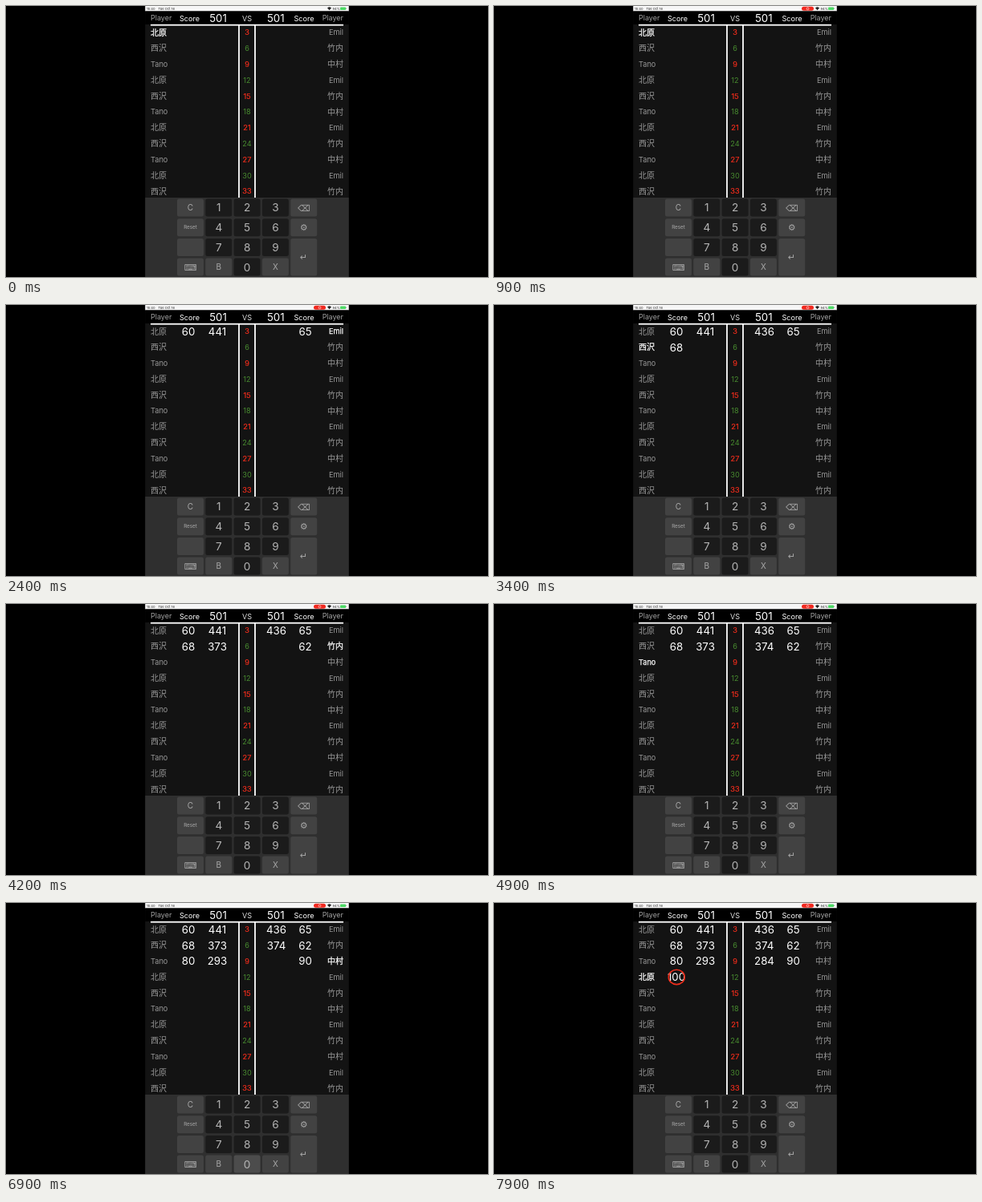
An HTML page for the animation above (8000 ms loop, 600x338 px).

```html
<!DOCTYPE html>
<html lang="ja">
<head>
<meta charset="utf-8">
<title>Dart score sheet</title>
<style>
html, body { margin: 0; width: 100%; height: 100%; overflow: hidden; background: #000; }
svg { display: block; width: 600px; height: 338px; }
text { font-family: Inter, "Noto Sans CJK JP", "Noto Sans CJK", "DejaVu Sans", sans-serif; }
.icon { font-family: "DejaVu Sans", sans-serif; }
.name { fill: #999; }
.name.on { fill: #fff; stroke: #fff; stroke-width: .25; }
</style>
</head>
<body>
<svg viewBox="0 0 600 338"></svg>
<script>
const LOOP = 8000, ROWS = 11, START = 501;
const NAMES = [['北原', '西沢', 'Tano'], ['Emil', '竹内', '中村']];
const SCORE_X = [227, 372.5], REST_X = [263, 336.5];
const PANEL_X = 173.25, PANEL_W = 253.5;
const rowY = r => 33 + r * 19.8;

// [time, key]; '↵' confirms a turn
const PRESSES = [
  [1100, '6'], [1400, '0'], [1700, '↵'],
  [2000, '6'], [2200, '5'], [2700, '↵'],
  [3000, '6'], [3200, '8'], [3600, '↵'],
  [3900, '6'], [4200, '2'], [4600, '↵'],
  [5100, '8'], [5300, '0'], [6300, '↵'],
  [6600, '9'], [6800, '0'], [7100, '↵'],
  [7400, '1'], [7600, '0'], [7700, '0']
];

const svg = document.querySelector('svg');

function add(tag, attrs, content = '') {
  const el = document.createElementNS('http://www.w3.org/2000/svg', tag);
  for (const k in attrs) el.setAttribute(k, attrs[k]);
  el.textContent = content;
  return svg.appendChild(el);
}
const rect = (x, y, width, height, fill, rx = 0) => add('rect', { x, y, width, height, fill, rx });
const label = (content, x, cy, size, fill, anchor = 'middle', cls = '') =>
  add('text', { x, y: cy + size * .364, 'font-size': size, fill, 'text-anchor': anchor, class: cls }, content);

// Status bar
rect(PANEL_X, 0, PANEL_W, 338, '#131313');
rect(PANEL_X, 0, PANEL_W, 6.5, '#f6f6f6');
label('15:40', 175, 3.2, 4.1, '#222', 'start');
label('Tue Oct 16', 189.5, 3.2, 4.1, '#222', 'start');
const pill = [rect(383, .8, 15, 5, '#f0281e', 2.5),
  add('circle', { cx: 390.5, cy: 3.3, r: 1.4, fill: 'none', stroke: '#fff', 'stroke-width': .6 })];
add('path', { d: 'M400 2.4Q402.5 .2 405 2.4L402.5 5.2Z', fill: '#222' });
label('94%', 406.5, 3.2, 4.1, '#222', 'start');
rect(416, 1.6, 7, 3.4, '#4cd964', .8);
rect(423.4, 2.6, .6, 1.4, '#777');

// Header
rect(PANEL_X, 6.5, PANEL_W, 16.5, '#000');
label('Player', 180, 15.2, 9, '#a2a2a2', 'start');
label('Player', 420, 15.2, 9, '#a2a2a2', 'end');
for (const x of [228.5, 371]) label('Score', x, 15.2, 9.1, '#fff');
for (const x of [264, 335.8]) label(START, x, 15, 13.3, '#fff');
label('VS', 300, 15.2, 9.1, '#ddd');

// Table
rect(180, 22.8, 240, 1.8, '#fff');
for (const x of [289.1, 309.1]) rect(x, 24, 1.8, 215, '#fff');
const rows = [];
for (let r = 0; r < ROWS; r++) {
  const y = rowY(r), odd = r % 2 === 0;
  const num = label(3 * (r + 1), 300, y, 9.2, odd ? '#f02d1c' : '#47892f');
  if (odd) num.setAttribute('style', 'stroke:#f02d1c;stroke-width:.2');
  rows.push([0, 1].map(s => {
    const name = NAMES[s][r % 3], size = /\w/.test(name) ? 9.2 : 10;
    return {
      name: label(name, s ? 420 : 180, y, size, '', s ? 'end' : 'start', 'name'),
      score: label('', SCORE_X[s], y, 13.3, '#fff'),
      rest: label('', REST_X[s], y, 13.3, '#fff')
    };
  }));
}
const ring = add('ellipse', { rx: 10, ry: 9.2, fill: 'none', stroke: '#ee2d1b', 'stroke-width': 1.6 });

// Keypad
rect(PANEL_X, 239, PANEL_W, 99, '#2f2f2f');
const keys = {};
[['C', '1', '2', '3', '⌫'], ['Reset', '4', '5', '6', '⚙'],
 ['', '7', '8', '9', '↵'], ['⌨', 'B', '0', 'X']].forEach((line, r) => line.forEach((key, c) => {
  const x = 213 + c * 35.3, y = 240.5 + r * 24.7;
  const digit = /^\d$/.test(key), icon = /[⌫⚙↵⌨]/.test(key);
  const h = key === '↵' ? 46.5 : 22;
  const fill = digit ? '#1b1b1b' : '#424242';
  keys[key] = { el: rect(x, y, 33, h, fill, 2.5), fill };
  const size = digit ? 13.6 : key === 'Reset' ? 6.3 : icon ? 11 : 10;
  label(key, x + 16.5, y + h / 2, size, digit ? '#b4b4b4' : '#a8a8a8', 'middle', icon ? 'icon' : '');
}));

function draw(t) {
  const turns = [''], left = [START, START];
  let flash = null;
  for (const [time, key] of PRESSES) {
    if (time > t) break;
    if (key === '↵') turns.push('');
    else turns[turns.length - 1] += key;
    if (t >= time + 100 && t < time + 200) flash = key;
  }
  const current = turns.length - 1;
  ring.setAttribute('visibility', 'hidden');
  rows.forEach((row, r) => row.forEach((cell, s) => {
    const i = r * 2 + s, entry = turns[i] || '';
    cell.name.classList.toggle('on', i === current);
    cell.score.textContent = entry;
    cell.rest.textContent = i < current ? left[s] -= entry : '';
    if (+entry >= 100) {
      ring.setAttribute('cx', SCORE_X[s] + .3);
      ring.setAttribute('cy', rowY(r));
      ring.setAttribute('visibility', 'visible');
    }
  }));
  for (const k in keys) keys[k].el.setAttribute('fill', k === flash ? '#4c4c4c' : keys[k].fill);
  for (const el of pill) el.setAttribute('visibility', t >= 500 ? 'visible' : 'hidden');
}

const begin = performance.now();
(function tick() {
  draw((performance.now() - begin) % LOOP);
  requestAnimationFrame(tick);
})();
</script>
</body>
</html>
```
